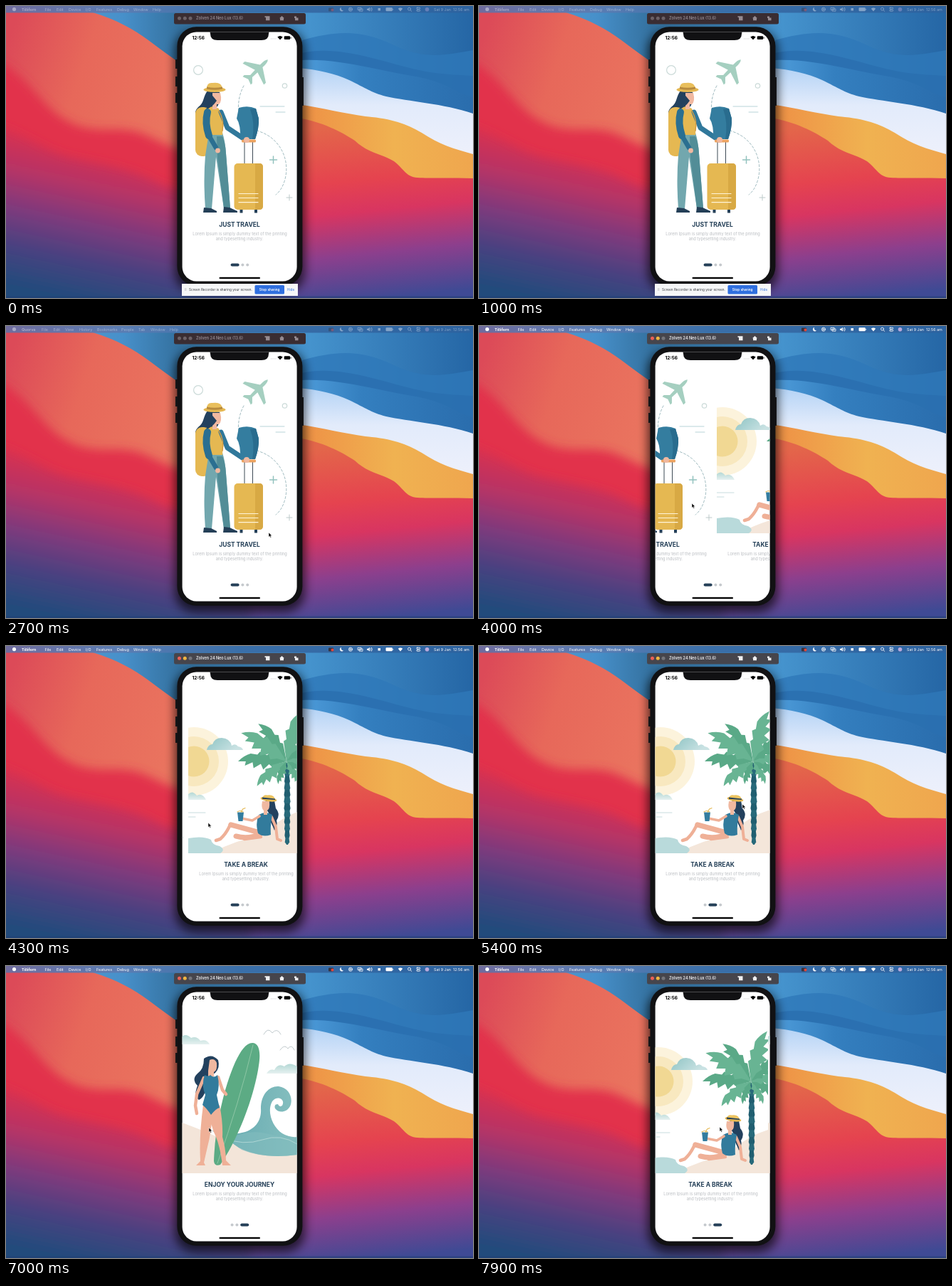
These frames come from a looping animation (656x410 px, 8000 ms). An HTML page:

```html
<!DOCTYPE html>
<html lang="en">
<head>
<meta charset="utf-8">
<title>Travel onboarding</title>
<style>
html,body{margin:0;width:100%;height:100%;overflow:hidden;background:#2b66a5}
svg{display:block;width:656px;height:410px;font-family:Inter,"Liberation Sans",sans-serif}
.line{fill:none;stroke-linecap:round;stroke-linejoin:round}
.heading{font-size:8.5px;font-weight:700;fill:#243f57;text-anchor:middle}
.body{font-size:5.7px;fill:#b9bcc0;text-anchor:middle}
.menu{font-size:5.4px;fill:#fff}
.app{font-weight:700}
</style>
</head>
<body>
<svg viewBox="0 0 656 410" xmlns="http://www.w3.org/2000/svg">
<defs>
<linearGradient id="sky"><stop offset="0" stop-color="#5b9fd2"/><stop offset=".25" stop-color="#4790ca"/><stop offset=".37" stop-color="#34719f"/><stop offset=".65" stop-color="#4593cd"/><stop offset="1" stop-color="#2566a5"/></linearGradient>
<linearGradient id="haze" gradientUnits="userSpaceOnUse" x1="416" y1="0" x2="656" y2="0"><stop offset="0" stop-color="#4e9cda"/><stop offset=".35" stop-color="#347fbf"/><stop offset="1" stop-color="#2a6dad"/></linearGradient>
<linearGradient id="coral" x1="0" y1=".2" x2="1" y2=".6"><stop offset="0" stop-color="#dc4a58"/><stop offset=".4" stop-color="#e7685a"/><stop offset="1" stop-color="#ea7660"/></linearGradient>
<linearGradient id="dusk" gradientUnits="userSpaceOnUse" x1="150" y1="205" x2="105" y2="415"><stop offset="0" stop-color="#d8304f"/><stop offset=".25" stop-color="#b63466"/><stop offset=".5" stop-color="#7d3a7d"/><stop offset=".75" stop-color="#464280"/><stop offset="1" stop-color="#214b7c"/></linearGradient>
<linearGradient id="white" x1="0" y1="0" x2="0" y2="1"><stop offset="0" stop-color="#b4d3f5"/><stop offset=".3" stop-color="#e2ebfb"/><stop offset="1" stop-color="#f6f4fb"/></linearGradient>
<linearGradient id="amber"><stop offset="0" stop-color="#ee8f45"/><stop offset=".55" stop-color="#f0b251"/><stop offset="1" stop-color="#efa64e"/></linearGradient>
<linearGradient id="ember" gradientUnits="userSpaceOnUse" x1="505" y1="165" x2="530" y2="410"><stop offset="0" stop-color="#e3664a"/><stop offset=".32" stop-color="#e5434f"/><stop offset=".5" stop-color="#d83561"/><stop offset=".74" stop-color="#8c3f8d"/><stop offset="1" stop-color="#3f4a94"/></linearGradient>
<linearGradient id="bar"><stop offset="0" stop-color="#6f6c9e"/><stop offset=".25" stop-color="#5a7db3"/><stop offset=".5" stop-color="#3a6fa9"/><stop offset="1" stop-color="#2c629f"/></linearGradient>
<linearGradient id="cloud" x1="0" y1="0" x2="1" y2=".4"><stop offset="0" stop-color="#8fc4c4"/><stop offset="1" stop-color="#c9e2e3"/></linearGradient>
<linearGradient id="mist" x1="0" y1="0" x2="0" y2="1"><stop offset="0" stop-color="#b4d8d5"/><stop offset="1" stop-color="#e6f1f0"/></linearGradient>
<linearGradient id="sea"><stop offset="0" stop-color="#5fa6ae"/><stop offset="1" stop-color="#86bfbf"/></linearGradient>
<clipPath id="screen"><rect x="247.6" y="36.4" width="161" height="350" rx="20"/></clipPath>
<clipPath id="page"><rect x="247" y="36" width="162" height="351"/></clipPath>
<clipPath id="coast"><path d="M0 9H122C155 19 180 33 200 48C216 60 232 72 250 84V410H0Z"/></clipPath>
<filter id="soft" x="-20%" y="-10%" width="140%" height="125%"><feGaussianBlur stdDeviation="7"/></filter>
</defs>

<!-- wallpaper -->
<rect width="656" height="410" fill="url(#sky)"/>
<path d="M416 48C465 34 500 33 545 55S620 68 656 62V200H416Z" fill="#2f79b9" opacity=".8"/>
<path d="M416 66C460 56 510 72 555 84S620 96 656 98V200H416Z" fill="#2a6fb0" opacity=".8"/>
<path d="M416 76C470 74 520 90 570 98S630 122 656 128V200H416Z" fill="url(#haze)"/>
<path d="M410 87C438 89 462 95 482 104C503 114 512 121 534 127C565 134 615 137 656 151V260H410Z" fill="url(#white)"/>
<path d="M410 138C445 143 475 151 505 155C540 158 562 165 584 178C608 194 630 201 656 208V270H410Z" fill="url(#amber)"/>
<path d="M410 157C445 163 470 176 490 189C509 207 527 207 545 218C559 229 562 240 578 241S630 241 656 242V410H330V300H410Z" fill="url(#ember)"/>
<g clip-path="url(#coast)">
<rect width="250" height="300" fill="url(#coral)"/>
<path d="M-20 72C30 95 48 140 84 160C125 185 160 164 196 181S240 202 270 205V330H-20Z" fill="#e2334b" filter="url(#soft)"/>
</g>
<path d="M-20 165C35 184 55 205 96 214C145 224 175 230 200 242S235 262 345 268V430H-20Z" fill="url(#dusk)" filter="url(#soft)"/>
<rect y="407.5" width="656" height="2.5" fill="#203f75" opacity=".55"/>

<!-- menu bar -->
<rect width="656" height="9.5" fill="url(#bar)"/>
<g id="menubar" class="menu">
<circle cx="11.5" cy="4.6" r="2.6"/>
<g id="simMenu"></g><g id="webMenu"></g>
<rect x="453" y="2.5" width="7" height="5" rx="1" fill="#37343f"/><circle cx="458.5" cy="5.5" r="2" fill="#e2473c"/>
<path d="M471 2A2.8 2.8 0 1 0 474 6.3A3 3 0 0 1 471 2Z"/>
<g class="line" stroke="#fff" stroke-width=".8">
<circle cx="484" cy="4.7" r="2.6"/><path d="M483.3 3.6L485.6 4.7L483.3 5.8Z"/>
<path d="M494.5 2.3H499V5.5H494.5ZM496.5 4H501V7.2H496.5Z"/>
<path d="M512 3Q513.4 4.7 512 6.4M513.5 2.2Q515.6 4.7 513.5 7.2"/>
<circle cx="566.5" cy="4.2" r="2"/><path d="M568 5.8L569.8 7.4"/>
<rect x="576.8" y="2.2" width="5" height="1.9" rx=".9"/><rect x="576.8" y="5.4" width="5" height="1.9" rx=".9"/>
</g>
<path d="M507 3.7H508.6L510.8 2V7.5L508.6 5.8H507Z"/>
<rect x="522.5" y="3" width="3.5" height="3.5"/>
<rect x="533.5" y="2.3" width="9.3" height="5" rx="1.2"/><rect x="543.3" y="3.8" width=".8" height="2"/>
<path d="M550.8 3.8Q554 1 557.2 3.8L554 7.5Z"/>
<circle cx="591.5" cy="4.7" r="2.8" fill="#b9a9dc"/>
<text x="601" y="6.5" xml:space="preserve">Sat 9 Jan  12:56 am</text>
</g>

<!-- phone window -->
<rect x="237" y="34" width="183" height="368" rx="28" opacity=".65" filter="url(#soft)"/>
<rect id="titlebar" x="236" y="10" width="185" height="15.5" rx="2.5"/>
<g id="lights"><circle cx="243.5" cy="17.2" r="2.5"/><circle cx="251.3" cy="17.2" r="2.5"/><circle cx="259" cy="17.2" r="2.5"/></g>
<g id="titleInk">
<text x="267" y="19.2" font-size="5.5" font-weight="600">Zolven 24 Neo Lux (13.6)</text>
<path d="M363.5 14.2H370.5V20.3H365V16H363.5ZM384 17.2L387.5 14L391 17.2H390V20.3H385V17.2ZM405 14.4H408V16.5H410.5V20.3H406V17H405Z"/>
</g>
<path d="M238 75H241V88H238ZM238 99H241V113H238ZM238 122H241V136H238ZM415 100H418V140H415Z" fill="#151517"/>
<rect x="240.4" y="29.2" width="176" height="363.6" rx="27" fill="#111113"/>
<rect x="247.6" y="36.4" width="161" height="350" rx="20" fill="#fff"/>
<g clip-path="url(#screen)">
<g id="pages">

<g clip-path="url(#page)">
<g class="line" stroke="#cbdad8" stroke-width="1.2"><circle cx="270" cy="90" r="6.4"/><circle cx="391.5" cy="112" r="3.2"/></g>
<path transform="translate(353 90) rotate(45)" fill="#a5cfc0" d="M0 -21Q3 -18 2.5 -8L21 4V8L2.5 2L2 12L8 18V21L0 18L-8 21V18L-2 12L-2.5 2L-21 8V4L-2.5 -8Q-3 -18 0 -21Z"/>
<g class="line" stroke="#9db9be" stroke-width="1" stroke-dasharray="3 2.6"><path d="M334 112Q323 132 328 159"/><path d="M352 175C386 184 399 217 392 243Q388 258 379 265"/></g>
<path class="line" stroke="#b0cfd3" stroke-width=".9" d="M357 141H391M379 149H392"/>
<path class="line" stroke="#92c2be" stroke-width="1.5" d="M370.5 216H380.5M375.5 211V221"/>
<path class="line" stroke="#bcc9c9" stroke-width="1" d="M394 269H402M398 265V273"/>
<path d="M284 118C276 127 279 136 270 142Q264 148 267 153Q280 157 292 146Q304 136 300 121Z" fill="#23415e"/>
<rect x="266" y="142" width="21" height="69" rx="9" fill="#e5b852"/>
<path d="M285 178H304Q308 190 309 207L315 284H306L295 212L289 285H280Q277 244 280 210Z" fill="#72a7ae"/>
<path d="M296 183H304Q308 191 309 207L315 284H306L297 213Z" fill="#528d97"/>
<path d="M281 143Q291 139 299 144Q306 162 304 181H284Z" fill="#e5b852"/>
<path d="M290 122H301Q304 134 299 138H296V145H290Z" fill="#f0b8a0"/>
<path d="M296 133Q289 143 281 145Q289 130 286 121Z" fill="#23415e"/>
<path class="line" stroke="#30789b" stroke-width="7" d="M302 149L311 171L332 185"/>
<path class="line" stroke="#2a6f91" stroke-width="10" d="M283 149Q279 164 285 182"/>
<path class="line" stroke="#2a6f91" stroke-width="6.5" d="M285 182L295 199"/>
<circle cx="297.5" cy="203" r="3.4" fill="#f0b8a0"/>
<path class="line" stroke="#d39b40" stroke-width="1.5" d="M299 147Q307 161 304 175"/>
<ellipse cx="293" cy="117.5" rx="15.5" ry="3.5" fill="#e5b852"/><path d="M282 116Q282 107 290 108Q303 106 304 116Z" fill="#e9bf5c"/><path d="M282 113.5Q293 116 304 113.5V116.5Q293 119 282 116.5Z" fill="#b78a3e"/>
<path d="M278 283L288 284L296 288V290H277ZM306 282L314 283L325 288V290H305Z" fill="#243f57"/>
<path d="M327 143Q340 139 351 144L355 158Q355 174 350 187H329Q330 167 324 158Z" fill="#347d9f"/>
<path d="M343 145Q350 164 346 187H350Q356 170 355 158L351 144Z" fill="#296c8e"/>
<path class="line" stroke="#3d4a55" stroke-width="1" d="M335 191V221M346.5 191V221"/>
<rect x="331" y="187.5" width="20" height="4" rx="1.5" fill="#eba260"/><circle cx="338" cy="188" r="4" fill="#f0b8a0"/>
<rect x="320.5" y="221" width="40.5" height="65" rx="5" fill="#e5b852"/><path d="M350 221H356Q361 221 361 226V281Q361 286 356 286H350Z" fill="#d8a944"/>
<path class="line" stroke="#fff4d8" stroke-width="1.2" d="M327 263.5H354M327 269.5H354M327 275.7H354"/>
<path d="M328.5 286H332.5V290.5H328.5ZM349 286H353V290.5H349Z" fill="#243f57"/>
<text class="heading" x="328" y="310.2">JUST TRAVEL</text>
</g>

<g clip-path="url(#page)" transform="translate(162)">
<circle cx="255" cy="162" r="48" fill="#fcf3dc"/><circle cx="255" cy="162" r="35" fill="#f8e8bf"/><circle cx="255" cy="162" r="21.5" fill="#f1d893"/>
<path d="M273 146Q275 138 281 138Q284 129 294 129Q306 130 308 140Q313 136 317 141Q323 142 324 146Z" fill="url(#cloud)"/>
<path d="M247 208Q253 202 259 210Q267 206 272 216H247Z" fill="url(#mist)"/>
<path class="line" stroke="#b9d4d6" stroke-width=".8" d="M247 234H271M247 240H257"/>
<path d="M278 291Q315 272 353 265Q376 240 409 230V291Z" fill="#f4e6da"/>
<path d="M247 270Q268 266 279 272Q280 279 291 281Q300 286 292 291H247Z" fill="#b9dadb"/>
<g id="palm"></g>
<path d="M356 217C351 229 362 231 361 240C362 248 366 252 368 259Q373 252 371 245Q377 236 370 228L368 217Z" fill="#23415e"/>
<g class="line" stroke="#efb097"><path stroke-width="7" d="M349 263Q333 272 314 267"/><path stroke-width="7.5" d="M347 262L307 251"/><path stroke-width="4.5" d="M306 251Q300 264 292 271L286 273"/><path stroke-width="4.5" d="M318 267L326 271L349 268"/><path stroke-width="4" d="M364 240L370 254L372 271L377 273"/></g>
<path d="M346 237Q356 231 365 237Q362 252 363 265Q352 269 345 263Q341 248 346 237Z" fill="#327b9c"/>
<path d="M351 218H361Q362 229 358 231V237H353V231Q349 228 351 218Z" fill="#f0b8a0"/>
<path class="line" stroke="#efb097" stroke-width="3.6" d="M347 239L337 245L322 242"/>
<ellipse cx="360" cy="215.3" rx="11.5" ry="3" transform="rotate(8 360 215)" fill="#e5b852"/><path d="M351 214Q352 208.5 358 209.5Q368 208 369 216Z" fill="#ecc460"/><path d="M351 212.5L369 214.5V216L351 214.7Z" fill="#243f57"/>
<path d="M316 233.5H325L323.5 246H317.5Z" fill="#347d9f"/><path class="line" stroke="#e5b852" stroke-width="1.2" d="M321 233.5L323.5 229L327 227.5M316 233Q320 230 324 233"/>
<text class="heading" x="328" y="310.2">TAKE A BREAK</text>
</g>

<g clip-path="url(#page)" transform="translate(324)">
<path d="M247 99Q253 94 260 101Q268 98 273 105Q282 102 286 110H247Z" fill="url(#mist)"/>
<path d="M366 151Q370 144 377 146Q382 136 391 141Q398 134 409 141V151Z" fill="url(#mist)"/>
<path class="line" stroke="#bac5c8" stroke-width=".9" d="M362 96Q368 85 374 94Q381 86 386 96M385 118Q391 109 396 116Q401 109 405 118"/>
<path d="M247 220Q278 231 303 243T363 263Q389 261 409 262V291H247Z" fill="#f3e5d9"/>
<path d="M289 231Q313 240 336 233C353 227 359 214 358 200C358 179 371 168 383 169C398 171 404 186 399 197C394 206 383 207 378 200Q376 194 382 194Q384 199 388 196C393 187 381 181 374 190C366 204 374 226 388 235Q398 241 409 240V265Q360 272 327 255Q309 242 289 231Z" fill="url(#sea)"/>
<path d="M310 243Q341 229 365 235T409 242V265Q362 271 331 258Z" fill="#82bdbe" opacity=".6"/>
<path class="line" stroke="#b9dcda" stroke-width=".8" d="M303 241Q334 253 360 244T409 250"/>
<path d="M347 108C356 109 358 122 355 140C350 175 331 235 301 279Q293 282 292 274C293 240 302 180 322 135C330 118 338 107 347 108Z" fill="#5cab84"/>
<path class="line" stroke="#93c9a9" stroke-width=".9" d="M347 111Q327 194 297 277"/>
<path d="M278 130Q289 122 298 132Q301 143 294 150Q284 155 282 165Q280 184 271 188C264 184 266 176 269 168Q260 159 269 151Q278 145 278 130Z" fill="#23415e"/>
<g class="line" stroke="#efb097"><path stroke-width="4.5" d="M278 157L268 180L266 196L268 207"/><path stroke-width="4.5" d="M298 156L304 174L309 180"/></g>
<path d="M277 195L290 208Q288 236 283 254L278 276L280 280H267L273 274Q271 240 277 195ZM287 206L300 195Q305 220 304 240Q309 258 309 273L316 280H304Q301 255 295 240Q287 225 287 206Z" fill="#efb097"/>
<path d="M286 132Q293 129 296 136Q297 147 292 149V155H284V147Z" fill="#f0b8a0"/>
<path d="M279 153Q284 156 287 153Q292 158 297 153Q301 169 296 181Q298 191 300 199Q295 200 288 209Q282 200 276 195L280 181Q274 168 279 153Z" fill="#327b9c"/>
<text class="heading" x="328" y="310.2">ENJOY YOUR JOURNEY</text>
</g>
</g>

<g id="dots"><rect/><rect/><rect/></g>
<rect x="299.5" y="380.8" width="57.5" height="2.2" rx="1.1"/>
<path d="M283 35H373Q369 35 369 39Q369 48 359 48H297Q287 48 287 39Q287 35 283 35Z" fill="#111113"/>
<text x="261.5" y="47.4" font-size="6.6" font-weight="700">12:56</text>
<path class="line" stroke="#bbb" stroke-width="1" stroke-dasharray=".1 2" d="M372.5 46H380"/>
<path d="M381.3 43.6Q385 40.6 388.7 43.6L385 47.5Z"/><rect x="390.7" y="42.3" width="8.5" height="4.8" rx="1.3"/><rect x="399.7" y="43.7" width=".8" height="2"/>
</g>

<!-- sharing notice -->
<g id="notice" font-size="4.7">
<rect x="247" y="390" width="163" height="17" fill="#f6f7f8"/>
<path d="M251.5 396V400M253 396V400" stroke="#b5b7bc" stroke-width=".6"/>
<text x="257" y="400.3" fill="#33363b">Screen Recorder is sharing your screen.</text>
<rect x="349.5" y="392" width="41.5" height="12.5" rx="1.5" fill="#2f6fdf"/>
<text x="370.2" y="400.2" fill="#fff" font-weight="600" text-anchor="middle">Stop sharing</text>
<text x="395" y="400.2" fill="#2f6fdf">Hide</text>
</g>
<g id="genie">
<path d="M250 391L407 390Q424 394 440 399L462 406Q424 406 390 404Q300 405 250 391Z" fill="#f6f7f8"/>
<path d="M356 392L396 392.5Q413 397 441 405Q408 405 390 403Q375 396 356 392Z" fill="#2f6fdf"/>
<path class="line" d="M276 397Q325 400 400 400" stroke="#55595f" stroke-width="1.3" stroke-dasharray="5 1"/>
</g>
<path id="cursor" d="M0 0V6.3L1.5 5L2.5 7.3L3.6 6.8L2.6 4.6H4.6Z" fill="#000" stroke="#fff" stroke-width=".5"/>
</svg>

<script>
const NS = "http://www.w3.org/2000/svg", LOOP = 8000, STEP = 100;
const $ = id => document.getElementById(id);

function add(parent, tag, attrs, text) {
  const el = document.createElementNS(NS, tag);
  for (const key in attrs) el.setAttribute(key, attrs[key]);
  if (text) el.textContent = text;
  return parent.appendChild(el);
}

function menu(id, items) {
  items.forEach(([x, label], i) => add($(id), "text", {x, y: 6.5, class: i ? "" : "app"}, label));
}
menu("simMenu", [[22, "Tillifern"], [54.5, "File"], [71, "Edit"], [88, "Device"], [112, "I/O"],
  [127, "Features"], [156, "Debug"], [179, "Window"], [206, "Help"]]);
menu("webMenu", [[22, "Quorva"], [50, "File"], [66.5, "Edit"], [83, "View"], [103, "History"],
  [128, "Bookmarks"], [162, "People"], [186, "Tab"], [203, "Window"], [230, "Help"]]);

for (const page of $("pages").children) {
  add(page, "text", {class: "body", x: 328.5, y: 322}, "Lorem Ipsum is simply dummy text of the printing");
  add(page, "text", {class: "body", x: 328, y: 328.8}, "and typesetting industry.");
}

// palm trunk and fronds
for (let i = 0; i < 12; i++) {
  const y = 164 + i * 9.5, w = 2.8 + 1.8 * Math.sin(Math.PI * (i + 1) / 13);
  const foot = i > 10 ? .8 : w * .75;
  add($("palm"), "path", {fill: i % 2 ? "#27697a" : "#205e70",
    d: `M${386 - w * .75} ${y}H${386 + w * .75}L${386 + w} ${y + 7}L${386 + foot} ${y + 10.5}H${386 - foot}L${386 - w} ${y + 7}Z`});
}
[[180, 68], [140, 54], [110, 34], [62, 36], [28, 46], [-8, 48], [-40, 54], [-72, 74], [-127, 66], [-148, 75]].forEach(([angle, size], i) => {
  const flip = Math.abs(angle) > 90 ? -1 : 1;
  add($("palm"), "path", {fill: i % 2 ? "#68b493" : "#5aa987",
    transform: `translate(385 162) rotate(${angle}) scale(${size} ${size * flip})`,
    d: "M0 0Q.2 -.1 .35 -.17L.4 -.13L.55 -.2L.6 -.14L.74 -.16Q.88 -.12 1 0L.84 0L.86 .09L.7 .02L.68 .14L.53 .05L.48 .17L.36 .06L.28 .13L.18 .05Z"});
});

function track(keys, t) {
  const n = keys.findIndex(k => k[0] > t);
  if (n < 0) return keys[keys.length - 1].slice(1);
  if (!n) return keys[0].slice(1);
  const a = keys[n - 1], b = keys[n], k = (t - a[0]) / (b[0] - a[0]);
  return a.slice(1).map((v, i) => v + (b[i + 1] - v) * k);
}

const scroll = [[3700, 0], [3800, -18], [3900, -47], [4000, -75], [4100, -113], [4200, -140], [4300, -153], [4500, -162],
  [6000, -162], [6100, -178], [6300, -238], [6400, -277], [6500, -304], [6600, -317], [6800, -324],
  [7400, -324], [7500, -314], [7600, -285], [7700, -235], [7800, -184], [7900, -165]];
const pointer = [[1000, 480, 412], [1300, 420, 402], [1500, 398, 397], [1800, 398, 397], [2400, 369, 290], [2800, 369, 290],
  [3500, 374, 253], [3700, 374, 250], [4000, 299, 249], [4200, 282, 249], [4600, 290, 246], [5100, 370, 222], [6000, 370, 222],
  [6400, 289, 226], [6700, 285, 227], [7400, 285, 227], [7700, 333, 226], [7900, 338, 226]];

const show = (id, on) => $(id).style.display = on ? "" : "none";

function draw(now) {
  const t = Math.floor(now % LOOP / STEP) * STEP;
  const active = t >= 3200, web = t >= 1500 && !active;
  const lit = active || t >= 1500 && t < 2200;

  $("menubar").setAttribute("opacity", lit ? 1 : .4);
  show("simMenu", !web);
  show("webMenu", web);

  $("titlebar").setAttribute("fill", active ? "#46454c" : "#3a2d32");
  $("titleInk").setAttribute("fill", active ? "#eeeef0" : "#958a90");
  const tints = active ? ["#ec5f55", "#efb541", "#74747a"] : Array(3).fill("#6c6166");
  tints.forEach((c, i) => $("lights").children[i].setAttribute("fill", c));

  show("notice", t < 1700);
  show("genie", t >= 1700 && t < 1900);
  $("genie").setAttribute("transform", t >= 1800 ? "translate(235 205) scale(.5)" : "");

  const [x] = track(scroll, t);
  $("pages").setAttribute("transform", `translate(${x})`);

  const current = t < 4600 ? 0 : t < 6800 ? 1 : 2;
  let left = 315.6;
  [...$("dots").children].forEach((dot, i) => {
    const on = i === current, w = on ? 12 : 4;
    const attrs = {x: left, y: 361.5, width: w, height: 4, rx: 2, fill: on ? "#243f57" : "#c5c9cd"};
    for (const key in attrs) dot.setAttribute(key, attrs[key]);
    left += w + 2.8;
  });

  const [cx, cy] = track(pointer, t);
  $("cursor").setAttribute("transform", `translate(${cx} ${cy})`);
  show("cursor", t >= 1100);
}

const start = performance.now();
function tick() {
  draw(performance.now() - start);
  requestAnimationFrame(tick);
}
tick();
</script>
</body>
</html>
```
